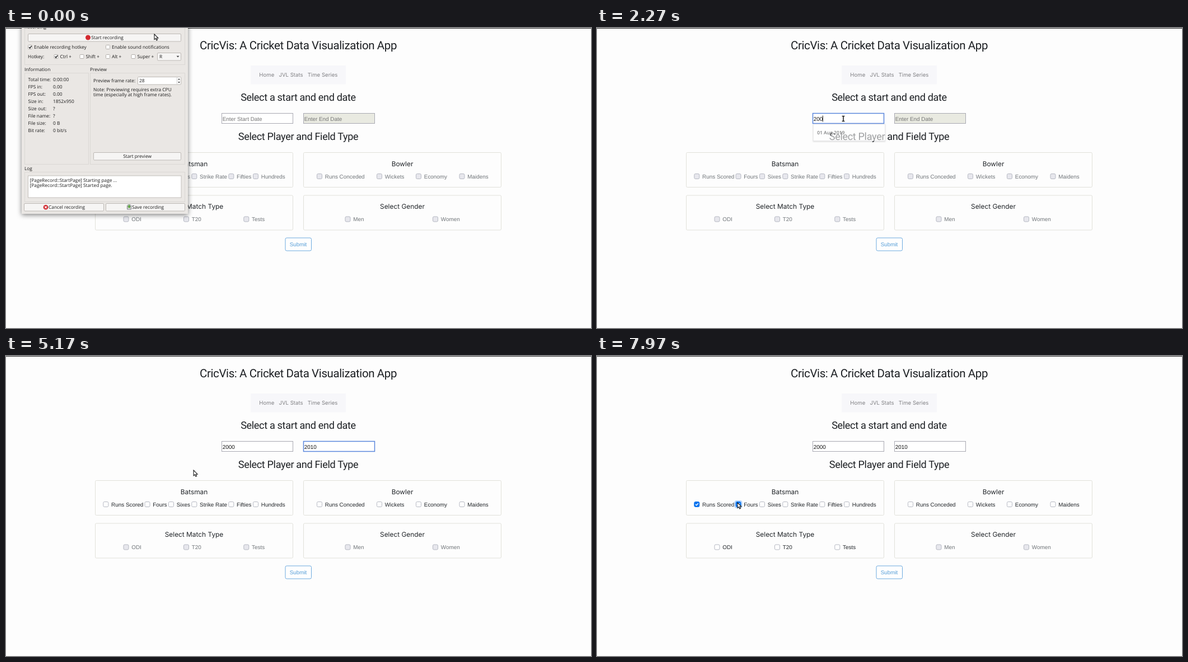
An HTML page for the animation above (8000 ms loop, 1045 by 536 pixels).

```html
<!DOCTYPE html>
<html lang="en">
<head>
<meta charset="utf-8">
<title>Cricket form</title>
<style>
html, body { margin: 0; width: 100%; height: 100%; overflow: hidden; background: #fdfdfd; }
svg { display: block; width: 1045px; height: 536px; text-rendering: geometricPrecision; }
text { white-space: pre; }
.title { font: 20.5px Roboto, sans-serif; letter-spacing: -.019em; fill: #1d2024; }
.sub { font: 18.1px Roboto, sans-serif; letter-spacing: -.019em; fill: #1d2024; }
.head { font: 11.9px Inter, sans-serif; fill: #212529; }
.nav { font: 9.6px Inter, sans-serif; fill: #808084; }
.form { font: 9.9px "Liberation Sans", Arial, sans-serif; fill: #6f7478; }
.menu { font: 600 8.5px "Open Sans", sans-serif; fill: #26282a; }
.ui { font: 8.34px "Open Sans", sans-serif; fill: #1c1c1c; }
.on text { fill: #212529; }
.box { fill: #e7e7ed; stroke: #b5b8c2; }
.on .box { fill: #fff; }
.on .checked .box { fill: #0b74ee; stroke: #0b74ee; }
.tick, .ring { fill: none; visibility: hidden; }
.tick { stroke: #fff; stroke-width: 1.4; }
.ring { stroke: #0b7bff; stroke-opacity: .3; stroke-width: 2; }
.checked .tick, .focus .ring { visibility: visible; }
.field { fill: #fff; stroke: #a9a9b2; }
.field.off { fill: #e9eae1; }
.field.active { stroke: #5b87dc; stroke-width: 1.5; }
.card { fill: none; stroke: #e1e1da; }
.btn { fill: #f6f5f4; stroke: #bdb9b5; }
.group { fill: none; stroke: #cbc8c5; stroke-dasharray: 1 1; }
</style>
</head>
<body>
<svg id="stage" viewBox="0 0 1045 536" xmlns="http://www.w3.org/2000/svg"></svg>
<script>
const SIZE = { title: 20.5, sub: 18.1, head: 11.9, nav: 9.6, form: 9.9, menu: 8.5, ui: 8.34 };
const LOOP = 8000;

// y is the middle of the capitals
const text = (cls, x, y, str, anchor = 'start', extra = '') =>
  `<text class="${cls}" x="${x}" y="${y + SIZE[cls] * .36}" text-anchor="${anchor}" ${extra}>${str}</text>`;
const mid = (cls, x, y, str) => text(cls, x, y, str, 'middle');
const rect = (cls, x, y, w, h, r = 0, extra = '') =>
  `<rect class="${cls}" x="${x + .5}" y="${y + .5}" width="${w}" height="${h}" rx="${r}" ${extra}/>`;

const option = (x, y, label) => `<g>
  <rect class="ring" x="${x - 6}" y="${y - 6}" width="12" height="12" rx="3"/>
  <rect class="box" x="${x - 4.5}" y="${y - 4.5}" width="9" height="9" rx="2"/>
  <path class="tick" d="M${x - 2.4} ${y}l1.8 1.8 3.1-3.5"/>
  ${text('form', x + 9.8, y, label)}</g>`;

const card = (id, x, y, heading, options) =>
  rect('card', x, y, 353, 62, 2) + mid('head', x + 177, y + 20.5, heading) +
  `<g id="${id}">${options.map(([ox, label]) => option(ox, y + 43, label)).join('')}</g>`;

const page = () => `
  <rect width="1045" height="536" fill="#fdfdfd"/>
  <rect width="1045" height="1" fill="#2a2a2a"/>
  ${mid('title', 522, 30.5, 'CricVis: A Cricket Data Visualization App')}
  <rect x="437" y="67" width="170" height="33.5" fill="#f7f7fa"/>
  ${mid('nav', 465.8, 83.7, 'Home')}${mid('nav', 509, 83.7, 'JVL Stats')}${mid('nav', 565.5, 83.7, 'Time Series')}
  ${mid('sub', 522, 123.7, 'Select a start and end date')}
  ${mid('sub', 522, 193.7, 'Select Player and Field Type')}
  ${card('batsman', 159, 222, 'Batsman', [[178.3, 'Runs Scored'], [252.5, 'Fours'], [295, 'Sixes'],
    [336.3, 'Strike Rate'], [402.3, 'Fifties'], [446, 'Hundreds']])}
  ${card('bowler', 531, 222, 'Bowler', [[560, 'Runs Conceded'], [667, 'Wickets'], [737, 'Economy'], [814.5, 'Maidens']])}
  ${card('match', 159, 298.5, 'Select Match Type', [[214.5, 'ODI'], [322, 'T20'], [429.3, 'Tests']])}
  ${card('gender', 531, 298.5, 'Select Gender', [[610.5, 'Men'], [767, 'Women']])}
  ${rect('', 498.5, 374.5, 46.5, 23, 2.5, 'fill="#fefefe" stroke="#6caadf"')}
  ${text('form', 522, 386.7, 'Submit', 'middle', 'style="fill:#589fd8"')}`;

const input = (id, x) => rect('field', x, 152, 127, 18, 0, `id="${id}Box"`) +
  text('form', x + 1.7, 162, '', 'start', `id="${id}Text"`);

const menu = (id, x, rows) => `<g id="${id}Menu">
  <rect id="${id}Sheet" x="${x}" y="171.5" width="128.5" fill="#fff" stroke="#d0d0d4" stroke-width=".8" filter="url(#soft)"/>
  ${rows.map((row, i) => text('menu', x + 7, 186.3 + i * 20.3, row)).join('')}</g>`;

const tick = (x, y, label, on) => rect('', x - 4, y - 4, 7, 7, 1, 'fill="#fff" stroke="#b3afab"') +
  (on ? `<path d="M${x - 2} ${y}l1.7 2 3-4.2" fill="none" stroke="#222" stroke-width="1.4"/>` : '') +
  text('ui', x + 7, y, label);
const button = (x, y, w, label, cx) => rect('btn', x, y, w, 13.5, 1.5) + mid('ui', cx, y + 7.3, label);
const info = [['Total time:', '0:00:00'], ['FPS in:', '0.00'], ['FPS out:', '0.00'], ['Size in:', '1852x950'],
  ['Size out:', '?'], ['File name:', '?'], ['File size:', '0 B'], ['Bit rate:', '0 bit/s']];

const recorder = () => `<g id="recorder">
  <rect x="28" y="-30" width="297" height="362" fill="#eae7e4" filter="url(#drop)"/>
  ${rect('group', 33, -8, 286, 73)}${text('ui', 33, -2, 'Recording')}
  ${button(39, 10, 273, 'Start recording', 181)}
  <circle cx="146.5" cy="17" r="4.5" fill="#d42a30"/>
  ${tick(43, 34, 'Enable recording hotkey', 1)}${tick(182, 34, 'Enable sound notifications')}
  ${text('ui', 39, 51, 'Hotkey:')}${tick(89.5, 51, 'Ctrl +', 1)}${tick(135.5, 51, 'Shift +')}
  ${tick(182, 51, 'Alt +')}${tick(227.5, 51, 'Super +')}
  ${rect('btn', 270, 44, 42, 13.5, 1.5)}${text('ui', 274, 51, 'R')}
  <path d="M304.5 49.7h5l-2.5 2.8z" fill="#444"/>
  ${text('ui', 33, 74, 'Information')}${text('ui', 150, 74, 'Preview')}
  ${rect('group', 33, 80, 114, 163)}${rect('group', 150, 80, 169, 163)}
  ${info.map(([k, v], i) => text('ui', 39.5, 91.5 + i * 13, k) + text('ui', 84, 91.5 + i * 13, v)).join('')}
  ${text('ui', 156, 94, 'Preview frame rate:')}
  ${rect('', 235, 87, 77, 13.5, 1, 'fill="#fff" stroke="#bdb9b5"')}${text('ui', 238, 94, '28')}
  <path d="M305.5 87.5v13" stroke="#ccc"/><path d="M307 92.5h4l-2-2.5zM307 96h4l-2 2.5z" fill="#444"/>
  ${text('ui', 156, 109.5, 'Note: Previewing requires extra CPU')}
  ${text('ui', 156, 119, 'time (especially at high frame rates).')}
  ${button(156, 222, 156, 'Start preview', 234.5)}
  ${text('ui', 33, 251, 'Log')}${rect('group', 33, 257, 286, 53)}
  ${rect('', 39, 263.5, 273.5, 39, 0, 'fill="#fff" stroke="#c4c0bc"')}
  ${text('ui', 42.5, 271.5, '[PageRecord::StartPage] Starting page ...')}
  ${text('ui', 42.5, 281, '[PageRecord::StartPage] Started page.')}
  ${button(32, 313, 142, 'Cancel recording', 108.5)}${button(178, 313, 141, 'Save recording', 253.5)}
  <circle cx="71" cy="320.3" r="4.3" fill="#d12a30"/>
  <path d="M69.2 318.5l3.6 3.6m0-3.6l-3.6 3.6" stroke="#fff" stroke-width="1.3"/>
  <path d="M216.5 318l1-2h5l1 2v6h-7z" fill="#d5d9d2" stroke="#667" stroke-width=".8"/>
  <path d="M220 315.5v5m-2.2-2l2.2 2.4 2.2-2.4" fill="none" stroke="#4a9a2c" stroke-width="1.6"/></g>`;

const pointers = `
  <path id="arrow" d="M0 0V9.6L2.2 7.6 3.8 11 5.5 10.2 4 7H6.9z" fill="#fff" stroke="#1a1a1a" stroke-width="1.1"/>
  <g id="beam" fill="none"><path d="M-2-4.5H2M0-4.5V4.5M-2 4.5H2" stroke="#fff" stroke-width="3"/>
  <path d="M-2.4-4.5H2.4M0-4.5V4.5M-2.4 4.5H2.4" stroke="#222" stroke-width="1.6"/></g>`;

const stage = document.getElementById('stage');
stage.innerHTML = `<defs>
  <filter id="drop" x="-10%" y="-10%" width="120%" height="120%"><feDropShadow dx="0" dy="2" stdDeviation="4.5" flood-opacity=".5"/></filter>
  <filter id="soft" x="-10%" y="-10%" width="120%" height="130%"><feDropShadow dx="0" dy="1" stdDeviation=".9" flood-opacity=".35"/></filter>
  </defs>` + page() + input('start', 385) + input('end', 531) +
  '<rect id="caret" y="156.5" width="1" height="11" fill="#111"/>' +
  menu('start', 384.5, ['01 Aug 2019']) + menu('end', 531, ['2017', '2018', '26 Aug 2019']) +
  recorder() + pointers;

const $ = id => document.getElementById(id);
const clamp = v => Math.max(0, Math.min(1, v));
const typed = (str, times, t) => str.slice(0, times.filter(at => t >= at).length);
const show = (el, on) => el.style.visibility = on ? 'visible' : 'hidden';

// time, x, y
const path = [[30, 265, 11], [640, 346, 52], [900, 346, 52], [1500, 440, 162], [4650, 440, 162],
  [5850, 179, 267], [6950, 179, 267], [7600, 251, 262], [8000, 251, 262]];

function pointerAt(t) {
  const i = path.findIndex(p => p[0] > t);
  if (i < 1) return path[0].slice(1);
  const [a, b] = [path[i - 1], path[i]];
  const k = (t - a[0]) / (b[0] - a[0]), e = k * k * (3 - 2 * k);
  return [a[1] + (b[1] - a[1]) * e, a[2] + (b[2] - a[2]) * e];
}

function setInput(id, value, hint, active, off) {
  $(id + 'Box').setAttribute('class', 'field' + (active ? ' active' : '') + (off ? ' off' : ''));
  $(id + 'Text').textContent = value || hint;
  $(id + 'Text').style.fill = value ? '#111' : '#757575';
}

function setMenu(id, rows, t, open, close) {
  const k = clamp((t - close) / 120), m = $(id + 'Menu');
  show(m, t >= open && k < 1);
  m.style.opacity = 1 - k;
  m.setAttribute('transform', `translate(${4 * k} ${k})`);
  $(id + 'Sheet').setAttribute('height', 9.5 + rows * 20.3);
  m.querySelectorAll('text').forEach((row, i) => row.style.display = i < rows ? '' : 'none');
}

function render(t) {
  const gone = clamp((t - 60) / 180), rec = $('recorder');
  show(rec, gone < 1);
  rec.style.opacity = 1 - gone;

  const start = typed('2000', [1950, 2090, 2220, 2360], t);
  const end = typed('2010', [3150, 3580, 3850, 4110], t);
  const inStart = t >= 1650 && t < 2750, inEnd = t >= 2750 && t < 6340;
  setInput('start', start, 'Enter Start Date', inStart);
  setInput('end', end, 'Enter End Date', inEnd, t < 2380);
  setMenu('start', 1, t, 1710, 2220);
  setMenu('end', end.length > 2 ? 2 : 3, t, 2830, 4110);

  const value = inEnd ? end : start;
  const blink = t < 4110 || (t - 4110) % 1200 < 600;
  show($('caret'), (inStart || inEnd) && blink);
  $('caret').setAttribute('x', (inEnd ? 532.3 : 386.3) + value.length * 5.51);

  for (const id of ['batsman', 'bowler']) {
    $(id).setAttribute('class', t >= 3150 ? 'on' : '');
    $(id).querySelectorAll('.box').forEach(b => b.style.fill = t >= 3150 && t < 3250 ? '#e7e7ed' : '');
  }
  $('match').setAttribute('class', t >= 6760 ? 'on' : '');
  const [runs, fours] = $('batsman').children;
  runs.setAttribute('class', (t >= 6730 ? 'checked ' : '') + (t >= 6340 && t < 7750 ? 'focus' : ''));
  runs.querySelector('.ring').style.visibility = t < 6730 ? 'hidden' : '';
  fours.setAttribute('class', (t >= 7830 ? 'checked ' : '') + (t >= 7750 ? 'focus' : ''));

  const [x, y] = pointerAt(t);
  const overField = x > 385 && x < 513 && y > 152 && y < 171;
  show($('arrow'), !overField);
  show($('beam'), overField);
  $(overField ? 'beam' : 'arrow').setAttribute('transform', `translate(${x} ${y})`);
}

const origin = performance.now();
(function tickFrame() {
  render((performance.now() - origin) % LOOP);
  requestAnimationFrame(tickFrame);
})();
</script>
</body>
</html>
```
